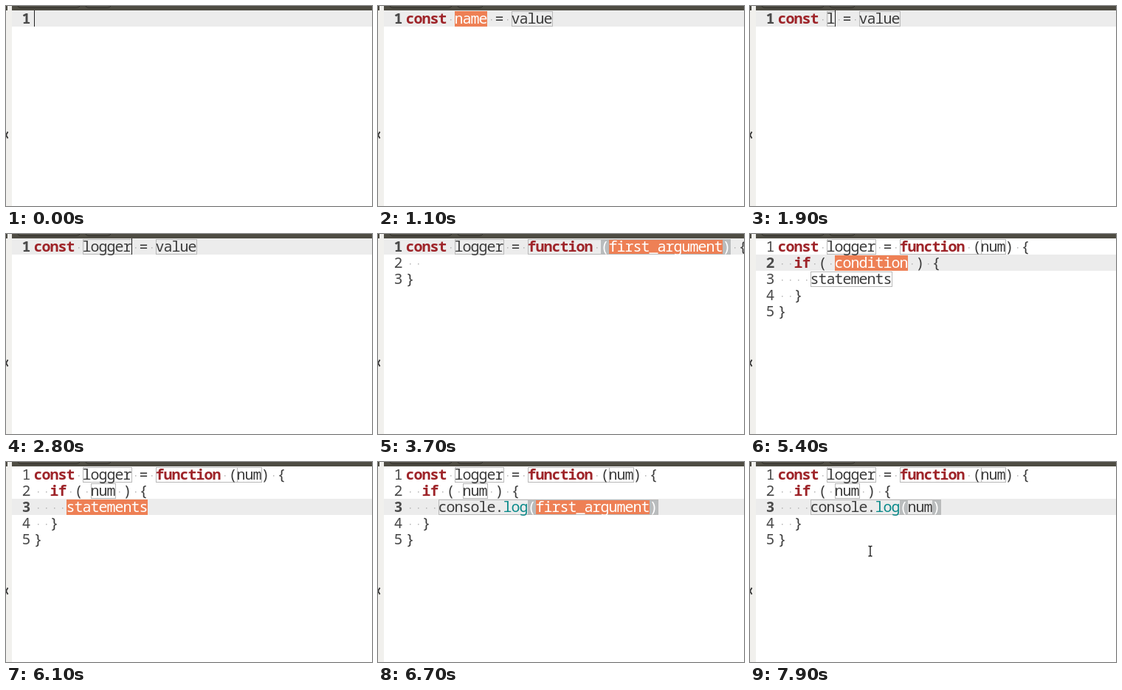
Write an HTML page that moves like this. It is 496 px wide and 272 px high and loops after 8000 ms.

```html
<!DOCTYPE html>
<html lang="en">
<head>
<meta charset="utf-8">
<title>Snippet typing</title>
<style>
html, body { margin: 0; width: 496px; height: 272px; overflow: hidden; background: #fff; }
svg { display: block; }
text { font: 20px "Noto Sans Mono", "DejaVu Sans Mono", monospace; letter-spacing: -1px; fill: #3b3b3b; white-space: pre; }
.keyword { font-weight: 700; fill: #9e2429; }
.call { fill: #0b8a8a; }
.light { fill: #fff; }
.number { fill: #4a4a4a; text-anchor: end; }
.current { font-weight: 700; }
.field { fill: none; stroke: #b9b9b9; }
</style>
</head>
<body>
<svg width="496" height="272" viewBox="0 0 496 272">
  <rect width="496" height="272" fill="#fff"/>
  <g id="editor"></g>
  <rect width="8" height="272" fill="#f1f0ed"/>
  <rect width="2" height="6" fill="#4b4941"/>
  <path d="M2.500 171L0 175.500L2.500 180" fill="none" stroke="#333" stroke-width="1.800"/>
  <rect x="8" width="488" height="6" fill="#4e4c43"/>
  <path d="M16 0Q17 2.500 20 2.500H95Q99 2.500 100 0M108 0Q109 2.500 112 2.500H137Q141 2.500 142 0" fill="none" stroke="#2f2e29"/>
</svg>
<script>
const LOOP = 8000, CELL = 11, LEFT = 38, TOP = 6, ROW = 22;
const ORANGE = '#ee8055';
const editor = document.getElementById('editor');

const colX = col => LEFT + col * CELL;
const rowY = row => TOP + row * ROW;
const rect = (x, y, w, h, fill) => `<rect x="${x}" y="${y}" width="${w}" height="${h}" fill="${fill}"/>`;
const label = (x, y, str, cls = '') => `<text x="${x - .5}" y="${y}" class="${cls}">${str}</text>`;

// The placeholder stays until the first key, then letters arrive at a steady pace.
function typed(t, placeholder, word, start, step) {
  if (t < start) return placeholder;
  return word.slice(0, 1 + Math.floor((t - start) / step));
}

function sceneAt(t) {
  const s = { lines: [], row: 0, fields: [], brackets: [], sel: null, caret: null, popup: null, pointer: t >= 7700 };
  const field = (row, col, len) => s.fields.push([row, col, len]);
  const focus = (row, col, str, selected) => {
    s.row = row;
    if (selected) s.sel = [row, col, str.length];
    else s.caret = [row, col + str.length];
  };
  const suggest = (row, col, width, height, items) => { s.popup = { row, col, width, height, items }; };

  if (t < 800) {
    const start = typed(t, '', 'cons', 200, 150);
    s.lines = [start];
    focus(0, 0, start, false);
    if (t >= 300) suggest(0, 0, 413, 55, ['cons   const name = value', 'cl     console.log']);
    return s;
  }

  const name = typed(t, 'name', 'logger', 1800, 200);
  field(0, 6, name.length);
  const valueCol = 9 + name.length;
  const head = `const ${name} = `;

  if (t < 3500) {
    const value = typed(t, 'value', 'fun', 3100, 100);
    s.lines = [head + value];
    field(0, valueCol, value.length);
    if (t < 2900) focus(0, 6, name, t < 1800);
    else focus(0, valueCol, value, t < 3100);
    if (t >= 3200) suggest(0, valueCol, 200, 26, ['fun  function']);
    return s;
  }

  const param = typed(t, 'first_argument', 'num', 3900, 100);
  const paramCol = valueCol + 10;
  s.lines = [`${head}function (${param}) {`, '  ', '}'];
  field(0, valueCol, 10 + param.length);
  if (t < 4400) {
    s.brackets = [[0, paramCol - 1], [0, paramCol + param.length]];
    focus(0, paramCol, param, t < 3900);
    return s;
  }
  field(0, paramCol, param.length);

  if (t < 5200) {
    const word = typed(t, '', 'if', 4600, 200);
    s.lines[1] += word;
    focus(1, 2, word, false);
    if (t >= 4900) suggest(1, 2, 317, 70, ['if   if', 'ife  if else', 'iife']);
    return s;
  }

  const test = typed(t, 'condition', 'num', 5600, 100);
  let body = typed(t, 'statements', 'con', 6200, 100);
  field(1, 7, test.length);
  if (t >= 6600) {
    const arg = typed(t, 'first_argument', 'num', 7300, 100);
    body = `console.log(${arg})`;
    s.brackets = [[2, 15], [2, 16 + arg.length]];
    focus(2, 16, arg, t < 7300);
    if (t >= 7800) s.caret = null;
  } else if (t >= 6000) {
    focus(2, 4, body, t < 6200);
    if (t >= 6300) suggest(2, 4, 260, 48, ['cl   console.log', 'const']);
  } else {
    focus(1, 7, test, t < 5600);
  }
  field(2, 4, body.length);
  s.lines = [s.lines[0], `  if ( ${test} ) {`, `    ${body}`, '  }', '}'];
  return s;
}

function drawLine(line, row, s) {
  const y = rowY(row) + 18;
  let out = '';
  for (const match of line.matchAll(/\w+|\s|[^\w\s]/g)) {
    const [token] = match, col = match.index, x = colX(col);
    if (token === ' ') {
      out += rect(x + 5, y - 6, 1.5, 1.5, '#b4b4b4');
      continue;
    }
    const selected = s.sel && s.sel[0] === row && col >= s.sel[1] && col < s.sel[1] + s.sel[2];
    const bracket = s.brackets.some(([r, c]) => r === row && c === col);
    let cls = '';
    if (selected || bracket) cls = 'light';
    else if (/^(const|function|if)$/.test(token)) cls = 'keyword';
    else if (token === 'log') cls = 'call';
    out += label(x, y, token, cls);
  }
  return out;
}

function drawPopup({ row, col, width, height, items }) {
  const x = colX(col) - 5, y = rowY(row + 1);
  const step = (height - 4) / items.length;
  return `<rect x="${x + .5}" y="${y + .5}" width="${width - 1}" height="${height - 1}" fill="#f5f5f4" stroke="#c6c6c4"/>`
    + rect(x + 1, y + 2, width - 2, step, '#dededc')
    + items.map((item, i) => label(x + 5, y + 2 + step * (i + .5) + 6, item)).join('');
}

function drawPointer() {
  const beam = 'M160.500 114.500H162L163 115.500L164 114.500H165.500M163 115.500V127M160.500 128H162L163 127L164 128H165.500';
  return `<path d="${beam}" fill="none" stroke="#fff" stroke-width="3.500"/><path d="${beam}" fill="none" stroke="#222" stroke-width="1.400"/>`;
}

function draw(s) {
  let out = rect(8, rowY(s.row), 488, ROW, '#ececec');
  for (const [row, col] of s.brackets) out += rect(colX(col), rowY(row) + 1, CELL, 21, '#b9bcbd');
  if (s.sel) out += rect(colX(s.sel[1]), rowY(s.sel[0]) + 1, s.sel[2] * CELL, 21, ORANGE);
  for (const [row, col, len] of s.fields) {
    if (s.sel && s.sel[0] === row && s.sel[1] === col) continue;
    out += `<rect class="field" x="${colX(col) + .5}" y="${rowY(row) + 1.5}" width="${len * CELL}" height="20"/>`;
  }
  s.lines.forEach((line, row) => {
    out += label(33, rowY(row) + 18, row + 1, row === s.row ? 'number current' : 'number');
    out += drawLine(line, row, s);
  });
  if (s.caret) out += rect(colX(s.caret[1]), rowY(s.caret[0]), 1, ROW, '#222');
  if (s.popup) out += drawPopup(s.popup);
  if (s.pointer) out += drawPointer();
  return out;
}

let shown = -1;
function render(now) {
  const t = Math.floor(now % LOOP / 50) * 50;
  if (t !== shown) {
    shown = t;
    editor.innerHTML = draw(sceneAt(t));
  }
}

const begin = performance.now();
function tick() {
  render(performance.now() - begin);
  requestAnimationFrame(tick);
}
tick();
</script>
</body>
</html>
```
